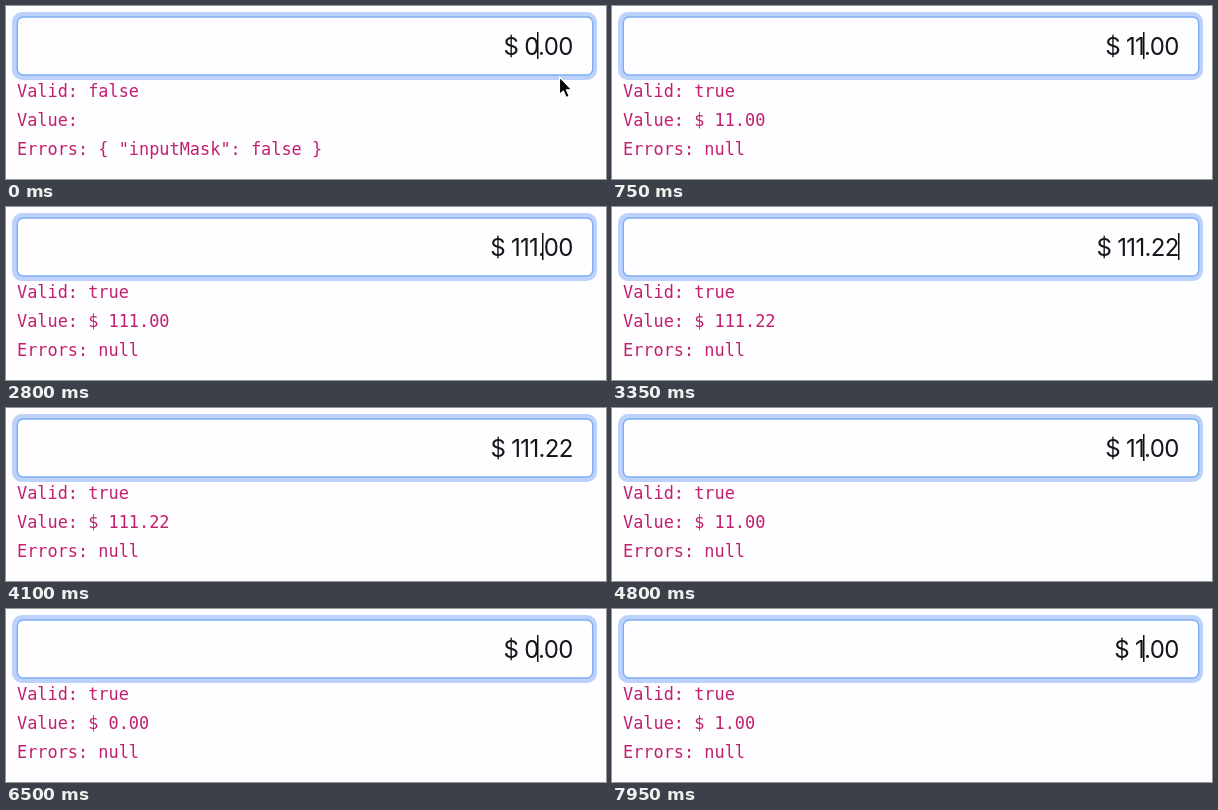
An HTML page that plays this animation: 600 by 173 pixels, repeating every 8000 ms.

```html
<!DOCTYPE html>
<html lang="en">
<head>
<meta charset="utf-8">
<title>Currency input mask</title>
<style>
  html, body { margin: 0; width: 100%; height: 100%; overflow: hidden; background: #fefdff; }
  svg { display: block; width: 600px; height: 173px; }
  #amount { font: 24px Inter, sans-serif; letter-spacing: -0.7px; text-anchor: end; fill: #15171a; }
  #status { font: 16.9px "DejaVu Sans Mono", monospace; fill: #c2206f; }
</style>
</head>
<body>
<svg viewBox="0 0 600 173">
  <rect x="6" y="6" width="585" height="68" rx="10" fill="#bdd2fb"/>
  <rect x="11.25" y="11" width="575.5" height="58" rx="6" fill="#fefdff" stroke="#80b0f3" stroke-width="1.5"/>
  <text id="amount" x="566.6" y="48.5"></text>
  <rect id="caret" y="26" width="1.5" height="27" fill="#111"/>
  <g id="status">
    <text id="valid" x="11" y="91"></text>
    <text id="value" x="11" y="120"></text>
    <text id="errors" x="11" y="149"></text>
  </g>
  <path id="pointer" d="M553.5 71V88.5L557.4 84.9L560.2 91.6L563.2 90.3L560.4 83.8H565.8Z"
        fill="#000" stroke="#fff" stroke-width="1.2" stroke-linejoin="round"/>
</svg>
<script>
  const LOOP = 8000, BLINK = 500;
  const UNITS = 531, CENTS = 536, TENTHS = 551, END = 566;

  // Each key press: time in ms, resulting amount, caret position
  const keys = [
    [0, '0.00', UNITS],
    [50, '1.00', UNITS],
    [750, '11.00', UNITS],
    [1400, '111.00', UNITS],
    [2600, '111.00', CENTS],
    [2950, '111.20', TENTHS],
    [3300, '111.22', END],
    [4500, '111.20', TENTHS],
    [4650, '111.00', CENTS],
    [4800, '11.00', UNITS],
    [5150, '1.00', UNITS],
    [5500, '0.00', UNITS],
    [7500, '1.00', UNITS],
  ];

  const el = id => document.getElementById(id);
  const setText = (id, text) => {
    if (el(id).textContent !== text) el(id).textContent = text;
  };
  const show = (id, on) => el(id).setAttribute('visibility', on ? 'visible' : 'hidden');

  function draw(now) {
    const t = now % LOOP;
    const [pressed, digits, caretX] = keys.findLast(([time]) => time <= t);
    const touched = pressed > 0;
    const amount = '$ ' + digits;

    setText('amount', amount);
    setText('valid', 'Valid: ' + touched);
    setText('value', 'Value: ' + (touched ? amount : ''));
    setText('errors', 'Errors: ' + (touched ? 'null' : '{ "inputMask": false }'));
    el('caret').setAttribute('x', caretX);
    show('caret', Math.floor((t - pressed) / BLINK) % 2 === 0);
    show('pointer', !touched);
  }

  const start = performance.now();
  function tick() {
    draw(performance.now() - start);
    requestAnimationFrame(tick);
  }
  tick();
</script>
</body>
</html>
```
